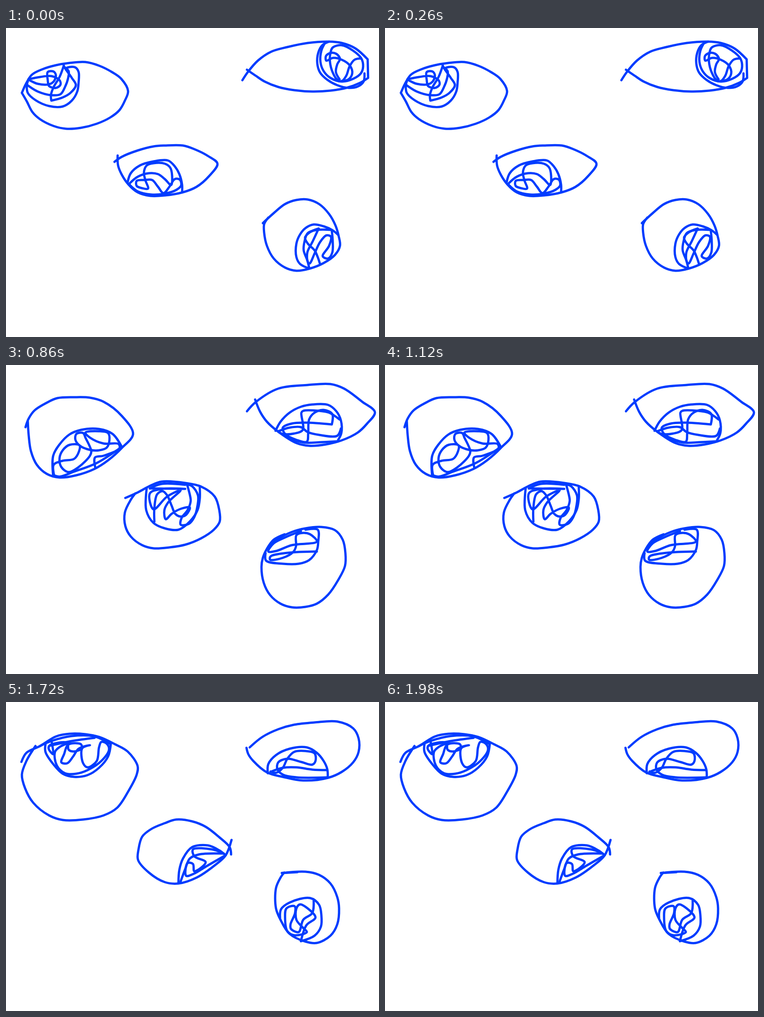
Recreate the animation shown at these times as an HTML page with a canvas. Size 822x681 px, loop 2150 ms.

```html
<!DOCTYPE html>
<html lang="en">
<head>
<meta charset="utf-8">
<title>Looking eyes</title>
<style>
  html, body { margin: 0; width: 100%; height: 100%; overflow: hidden; background: #fff; }
  canvas { display: block; width: 822px; height: 681px; }
</style>
</head>
<body>
<canvas id="stage" width="822" height="681"></canvas>
<script>
const ctx = document.getElementById('stage').getContext('2d');
const POSE_MS = 430;

// Bezier handle at p (leaning towards b) of a centripetal spline through a, p, b.
function handle(a, p, b) {
  const d1 = Math.sqrt(Math.hypot(p[0] - a[0], p[1] - a[1]));
  const d2 = Math.sqrt(Math.hypot(b[0] - p[0], b[1] - p[1]));
  if (!d1 || !d2) return p;
  return [0, 1].map(i =>
    (d1 * d1 * b[i] - d2 * d2 * a[i] + (2 * d1 * d1 + 3 * d1 * d2 + d2 * d2) * p[i]) /
    (3 * d1 * (d1 + d2)) - p[i])
    .map((v, i) => p[i] + (v - (d2 * d2 ? 0 : v)));
}

// Smooth pen line through x, y pairs; a doubled point makes a corner.
function pen(...xy) {
  const pts = [];
  for (let i = 0; i < xy.length; i += 2) pts.push([xy[i], xy[i + 1]]);
  const last = pts.length - 1;
  ctx.beginPath();
  ctx.moveTo(...pts[0]);
  for (let i = 0; i < last; i++) {
    const p = pts[i], q = pts[i + 1];
    const before = pts[Math.max(i - 1, 0)], after = pts[Math.min(i + 2, last)];
    ctx.bezierCurveTo(...handle(before, p, q), ...handle(after, q, p), ...q);
  }
  ctx.stroke();
}

function lookUpAndDown() {
  pen(35,143, 44,123, 57,103, 80,91, 110,82, 140,77, 175,75, 205,83, 235,98, 254,112, 269,139, 262,160, 250,181, 230,197, 200,211, 165,220, 132,222, 105,216, 75,201, 58,185, 46,162, 35,143);
  pen(50,112, 46,126, 48,143, 65,159, 95,172, 125,173, 145,160, 157,140, 160,120, 160,97, 153,87, 140,86, 131,89);
  pen(50,113, 75,108, 100,106, 118,115, 120,125, 110,132, 95,128, 92,115, 92,97, 105,96, 110,105, 105,118, 95,124, 70,123, 52,115);
  pen(46,125, 70,140, 100,148, 120,146, 130,130, 137,110, 138,95, 131,88);
  pen(127,84, 118,108, 105,130, 99,148, 100,160, 100,160, 125,153, 142,143, 154,126, 145,110, 131,90, 127,82);

  pen(521,115, 533,97, 555,72, 585,52, 620,42, 665,33, 712,30, 740,33, 770,45, 797,69, 797,69, 798,110, 798,110, 780,121, 750,132, 715,138, 675,140, 635,137, 600,130, 570,118, 550,105, 531,92);
  pen(712,30, 697,38, 688,55, 686,78, 692,98, 708,114, 730,126, 755,132, 775,129, 788,118, 790,100);
  pen(703,33, 695,50, 693,75, 700,95, 715,110, 740,118, 765,112, 782,100, 787,85, 783,67, 765,50, 740,38, 720,43, 715,55, 714,75, 720,98, 730,114, 740,117, 750,105, 757,85, 768,70, 783,67);
  pen(735,113, 727,97, 730,80, 736,68, 728,57, 715,55, 705,62, 706,72, 720,66, 740,70, 758,83, 763,100, 755,113, 740,117);

  pen(239,295, 255,284, 290,270, 325,261, 350,259, 390,259, 415,267, 445,282, 466,299, 447,327, 420,350, 390,362, 350,369, 318,370, 290,362, 270,345, 255,323, 247,303, 246,281);
  pen(268,340, 275,320, 295,303, 325,294, 357,292, 372,305, 382,322, 388,345, 388,362);
  pen(272,343, 290,328, 315,320, 335,322, 350,333, 364,346, 366,325, 362,308, 350,299, 325,298, 310,303, 304,318, 307,335, 313,354, 300,353, 288,348, 288,337, 305,335, 322,335, 335,350, 347,364, 360,350, 372,333, 383,334, 386,347, 375,357, 350,365, 320,367, 290,360, 272,345);

  pen(566,430, 590,408, 615,388, 640,379, 665,378, 690,388, 712,410, 726,435, 733,458, 736,480, 725,500, 700,518, 670,530, 640,535, 615,528, 590,508, 575,480, 569,452, 569,432, 578,418);
  pen(732,456, 720,446, 700,437, 678,433, 660,441, 648,455, 640,475, 640,505, 648,520, 668,530);
  pen(718,445, 685,445, 665,452, 658,470, 656,490, 664,512, 668,528);
  pen(689,442, 676,470, 664,495, 665,515, 669,519, 680,497, 692,472, 706,457, 716,460, 712,480, 698,503, 710,508, 719,495, 720,470, 718,447);
  pen(689,442, 670,450, 659,462, 665,475, 680,490, 687,505, 692,520);
}

function lookLeft() {
  pen(52,155, 37,137, 45,127, 65,109, 100,86, 145,70, 200,69, 235,82, 266,103, 275,125, 276,150, 265,178, 230,214, 205,225, 165,234, 125,236, 97,234, 80,213, 62,190, 48,158, 43,130);
  pen(45,147, 55,130, 70,121, 113,117, 135,131, 152,155, 155,178, 145,202, 125,222, 105,231, 90,228, 65,195, 55,165);
  pen(87,224, 105,228, 130,212, 150,188, 153,160, 130,158, 105,164, 85,173, 60,176, 56,155, 68,133, 105,127, 114,145, 115,165, 103,190, 105,194, 123,196, 123,180, 113,157, 105,150, 92,148, 90,180, 87,224);

  pen(523,112, 556,74, 600,51, 640,33, 680,25, 715,33, 750,54, 775,84, 793,122, 780,138, 755,153, 725,162, 690,163, 660,155, 620,133, 575,102, 565,90, 556,70);
  pen(659,155, 662,138, 675,118, 700,100, 735,95, 765,105, 785,125);
  pen(680,136, 710,121, 735,117, 755,122, 771,131, 770,115, 758,105, 735,97, 712,100, 720,125, 728,148, 710,152, 704,140, 702,120, 695,113, 680,117, 676,130, 680,150, 700,153, 720,148);
  pen(680,152, 700,153, 720,157, 755,150, 785,127);

  pen(245,295, 270,290, 300,285, 335,278, 395,276, 425,282, 455,297, 462,328, 440,352, 415,370, 380,386, 345,395, 310,398, 288,387, 272,367, 262,340, 259,318, 263,297);
  pen(272,364, 280,368, 305,367, 330,355, 350,338, 350,308, 335,295, 315,286, 290,290, 270,298, 264,320, 266,345, 272,362);
  pen(272,362, 290,328, 310,298, 290,298, 287,320, 300,345, 318,353, 326,335, 315,319, 300,317, 290,335, 283,350, 300,362, 315,340, 328,317, 310,308, 290,308, 270,318, 290,333, 315,341, 337,347);
  pen(272,297, 290,294, 310,299, 344,301, 349,310, 348,336, 337,347);

  pen(569,425, 581,397);
  pen(581,397, 605,375, 635,358, 680,353, 700,363, 718,375, 732,400, 739,430, 740,465, 730,485, 705,507, 675,520, 630,525, 600,516, 580,498, 568,465, 565,430, 580,398);
  pen(675,369, 687,361, 680,360, 665,378, 646,403, 639,435, 645,463, 672,475, 690,478, 732,480, 738,472);
  pen(675,369, 715,374, 725,400, 732,440, 735,475);
  pen(675,368, 665,395, 660,430, 675,410, 690,400, 711,394);
  pen(664,403, 690,399);
  pen(664,403, 655,425, 651,447, 665,453, 680,432, 690,425, 715,420, 695,430, 684,445, 690,472, 730,457, 733,477);
  pen(712,376, 690,381, 700,420, 697,450, 685,470, 673,475);
}

function lookDown() {
  pen(43,137, 50,118, 63,100, 90,83, 113,73, 150,71, 185,72, 215,81, 255,112, 280,152, 255,183, 225,210, 195,229, 155,243, 118,248, 90,240, 68,220, 55,190, 50,155, 48,122);
  pen(104,245, 104,200, 118,175, 140,153, 165,143, 205,141, 235,152, 255,180);
  pen(106,243, 105,220, 125,211, 150,207, 161,190, 162,177, 140,176, 125,188, 118,205, 122,225, 138,236, 160,225, 185,200, 188,190, 175,160, 170,150, 155,152, 153,165, 163,178, 185,187, 205,188, 222,182, 228,165, 225,150, 205,146, 175,149, 185,160, 215,173, 248,174, 250,184, 215,200, 196,204, 197,227);
  pen(106,243, 118,246, 150,235, 200,216, 250,184);

  pen(531,102, 550,82, 600,52, 665,44, 715,42, 745,52, 785,81, 813,104, 795,130, 775,149, 740,166, 705,175, 668,178, 640,172, 600,147, 575,125, 560,103, 549,76);
  pen(594,145, 605,125, 625,105, 650,92, 675,87, 710,88, 728,102, 738,122, 739,150, 732,165);
  pen(601,148, 610,152, 635,151, 654,143, 651,105, 655,101, 690,101, 712,105, 735,120);
  pen(718,131, 719,108, 700,99, 680,105, 668,120, 666,150, 663,169, 640,165, 615,152, 610,138, 630,129, 660,127, 718,131);
  pen(600,146, 625,138, 650,137, 665,148, 690,154, 730,156, 738,140);
  pen(732,168, 695,170, 657,171, 625,162, 600,147);

  pen(263,293, 290,281, 320,265, 343,257, 395,260, 430,268, 460,290, 470,320, 471,345, 458,363, 430,382, 395,396, 360,402, 325,404, 300,397, 275,378, 263,355, 262,325, 275,297, 285,283);
  pen(310,272, 309,320, 325,348, 350,360, 380,363, 405,345, 422,320, 427,295, 427,270);
  pen(317,272, 343,262, 395,264);
  pen(327,345, 327,315, 333,285, 345,278, 355,287, 365,310, 373,328, 385,334, 397,330, 405,314, 385,317, 365,328, 352,340, 349,320, 358,302, 385,276, 355,290, 325,318, 317,283, 345,273, 395,273, 317,272);
  pen(399,263, 406,290, 407,300, 400,320, 387,337, 385,352, 403,350, 415,335, 422,310, 423,287, 410,267, 399,263);

  pen(580,400, 600,383, 630,368, 660,360, 695,357, 725,364, 742,385, 748,415, 747,443, 732,474, 710,506, 685,526, 660,533, 630,534, 605,526, 582,507, 568,480, 563,445, 566,425, 575,405, 590,385, 614,373);
  pen(572,415, 573,431, 610,438, 645,438, 668,430, 685,408, 688,390, 687,363, 660,363);
  pen(650,366, 615,380, 590,393, 578,411, 595,410, 630,397, 685,389, 670,373, 655,370, 640,375, 639,400, 633,412, 610,425, 582,429, 583,422, 620,414, 685,411);
}

function lookAside() {
  pen(34,116, 33,150, 38,180, 50,207, 70,236, 100,260, 125,271, 165,270, 200,261, 235,240, 265,208, 282,175, 294,140, 275,116, 250,99, 220,82, 180,69, 135,69, 105,79, 70,98, 48,118, 43,129);
  pen(210,78, 185,86, 162,105, 154,130, 156,160, 170,185, 190,204, 220,214, 250,213, 272,200, 283,175, 283,145);
  pen(185,175, 168,175, 164,155, 165,125, 180,105, 215,92, 251,86, 240,107, 215,135, 195,150, 185,172);
  pen(291,141, 250,131, 210,110, 183,100, 182,150, 180,205, 185,224, 200,212, 225,185, 250,155, 275,146, 283,148);
  pen(291,141, 215,136, 200,148, 202,165, 215,174, 230,172, 245,155, 265,146);
  pen(272,148, 272,185, 260,208, 250,204, 243,190, 245,175, 255,165, 262,175, 270,192, 230,193, 205,207);

  pen(528,102, 555,73, 595,53, 625,41, 655,34, 715,33, 745,39, 785,64, 791,90, 790,128, 775,145, 745,158, 710,165, 670,167, 640,162, 605,150, 575,127, 550,105, 534,79);
  pen(585,52, 635,53, 655,65, 660,85, 660,115, 645,138, 625,150, 605,148, 575,125, 550,105, 547,85, 555,71, 585,68, 606,62, 595,63, 575,78, 563,95, 590,85, 615,72, 645,64, 655,68, 657,100, 640,85, 615,68, 613,60, 622,58, 640,75, 655,100);
  pen(550,105, 565,110, 590,105, 620,88, 640,93, 657,102);
  pen(613,65, 620,85, 635,100, 640,120, 630,140, 610,143, 608,125, 615,114, 635,115, 658,123);

  pen(285,283, 300,268);
  pen(300,270, 340,250, 385,242, 420,251, 450,272, 475,300, 490,328, 500,356, 480,367, 440,383, 410,391, 350,394, 320,383, 290,362, 279,345, 279,315, 283,295, 300,268);
  pen(463,278, 440,279, 415,285, 401,295, 400,330, 410,352, 430,364, 465,370, 500,357);
  pen(403,290, 418,276, 435,271, 452,272);
  pen(410,287, 440,276, 455,288, 475,317, 497,352);
  pen(408,288, 405,320, 410,335, 428,348, 432,325, 437,300, 425,297, 420,325, 414,340);
  pen(463,280, 437,288, 425,298, 435,320, 455,345, 485,358, 475,335, 449,303, 449,340, 451,370);

  pen(569,409, 575,400, 605,384, 640,371, 665,365, 705,363, 730,380, 746,410, 752,440, 752,472, 740,497, 715,515, 690,523, 665,525, 640,515, 615,498, 590,472, 577,445, 575,415, 580,400, 595,387);
  pen(595,388, 612,384, 640,384, 655,400, 664,430, 665,465, 655,487, 640,496, 615,500);
  pen(612,385, 595,405, 587,425, 587,455, 595,468, 600,435, 607,412, 620,399, 625,400, 625,440, 625,470, 635,460, 645,435, 646,410, 635,402, 622,406, 610,424, 625,438, 645,450, 655,475);
  pen(661,477, 617,480, 620,488, 635,496, 650,488, 661,477);
  pen(595,387, 581,405, 582,440, 600,475, 615,498);
}

function lookAround() {
  pen(34,132, 45,112, 75,97, 110,76, 140,70, 175,71, 205,77, 240,93, 268,109, 290,141, 288,160, 270,196, 245,233, 215,250, 170,259, 125,260, 95,250, 60,222, 42,190, 35,160, 45,130, 65,97);
  pen(87,93, 87,110, 105,138, 125,158, 150,165, 180,161, 205,145, 225,120, 231,92);
  pen(75,97, 100,86, 145,75, 195,76, 229,92);
  pen(98,96, 145,86, 195,79);
  pen(100,85, 104,115, 94,103, 96,96, 135,90, 138,105, 150,109, 167,102, 165,93, 137,94, 128,115, 122,133, 135,135, 148,120, 160,103, 185,95, 168,102, 170,135, 180,144, 200,130, 205,100, 210,88, 222,92, 227,105, 210,130, 180,150, 155,158, 130,157, 112,140, 108,110, 120,98, 140,90);

  pen(537,100, 565,77, 600,60, 635,50, 680,45, 730,43, 765,58, 777,80, 777,110, 765,133, 740,154, 710,167, 655,173, 610,165, 575,155, 545,130, 534,115, 530,101);
  pen(577,157, 578,137, 595,117, 625,103, 663,100, 685,112, 700,130, 708,148, 709,167);
  pen(583,153, 595,156, 610,145, 620,125, 635,110, 660,108, 680,113, 682,130, 675,138, 650,132, 620,125, 600,133, 598,148, 610,160, 640,166, 709,166);
  pen(583,154, 610,145, 640,144, 675,149, 707,150);

  pen(497,304, 484,338, 460,360, 420,387, 380,400, 350,397, 315,376, 291,348, 292,325, 300,297, 320,280, 350,267, 375,259, 410,263, 440,275, 470,298, 493,320, 496,336);
  pen(380,399, 382,370, 390,345, 410,320, 445,316, 470,327, 484,338);
  pen(475,332, 455,325, 412,325, 415,340, 440,353, 415,373, 412,357, 400,355, 397,383, 415,378, 440,363, 480,340);
  pen(384,398, 395,368, 405,345, 425,336, 480,334);

  pen(608,377, 642,375);
  pen(608,377, 660,374, 690,381, 715,400, 730,430, 734,455, 730,490, 715,515, 685,531, 660,528, 625,511, 605,480, 595,455, 595,410, 605,387, 613,376);
  pen(604,476, 606,457, 625,442, 670,432, 690,447, 695,470, 694,495, 680,515, 650,527);
  pen(678,438, 675,465, 655,480, 645,507, 628,500, 627,490, 637,465, 636,450, 618,455, 615,475, 620,505, 635,514, 663,507, 655,498, 640,480, 640,455, 648,446, 665,455, 682,475, 662,492, 650,527);
}

const poses = [lookUpAndDown, lookLeft, lookDown, lookAside, lookAround];
let shown = -1;

function draw(now) {
  const index = Math.floor(now / POSE_MS) % poses.length;
  if (index !== shown) {
    shown = index;
    ctx.fillStyle = '#fff';
    ctx.fillRect(0, 0, 822, 681);
    ctx.strokeStyle = '#003cff';
    ctx.lineWidth = 5;
    ctx.lineCap = ctx.lineJoin = 'round';
    poses[index]();
  }
}

const start = performance.now();
function tick() {
  draw(performance.now() - start);
  requestAnimationFrame(tick);
}
tick();
</script>
</body>
</html>
```
